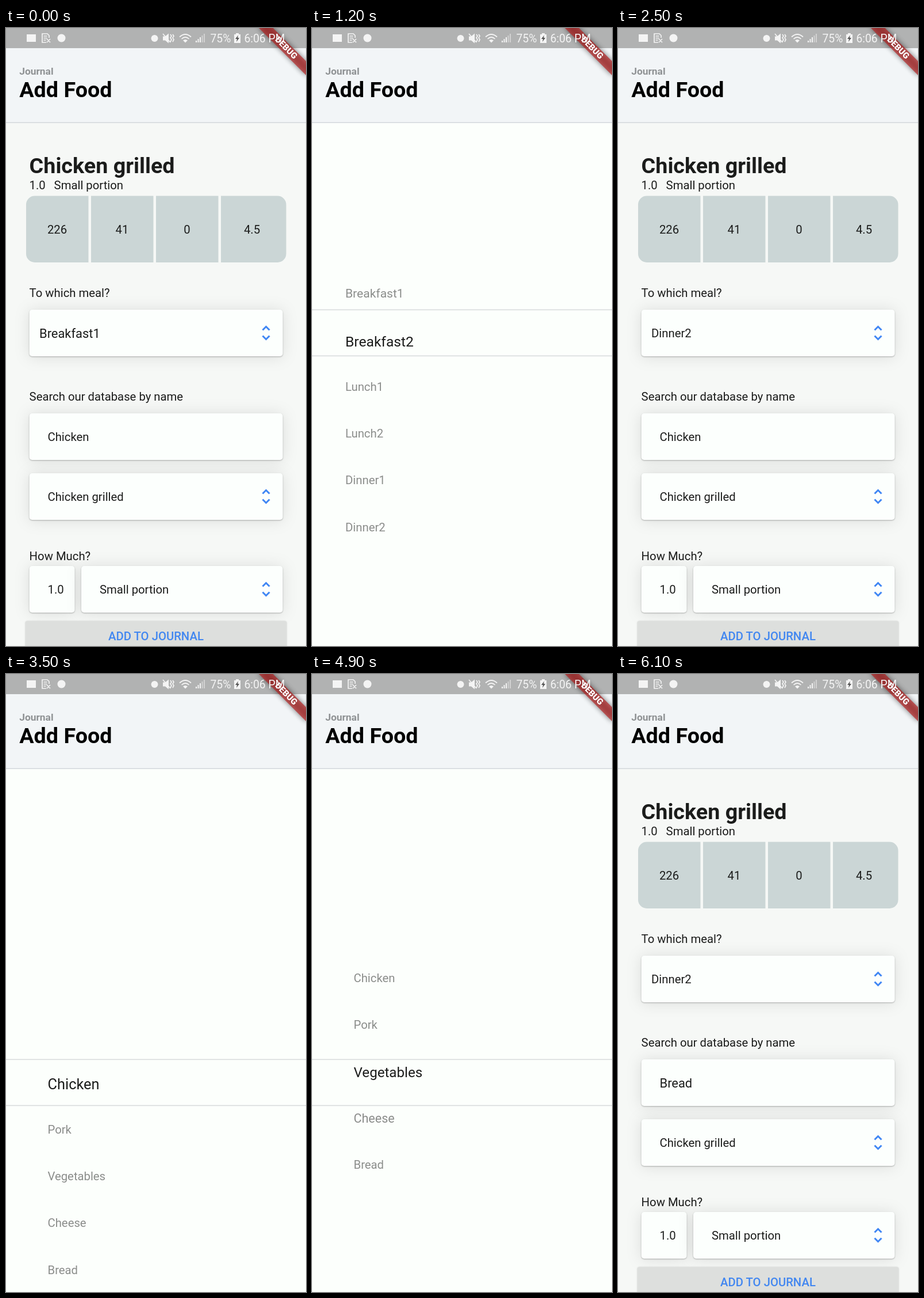
An HTML page for the animation above (6.2 s loop, 522 by 1073 pixels).

```html
<!DOCTYPE html>
<html lang="en">
<head>
<meta charset="utf-8">
<title>Add Food</title>
<style>
  html, body { margin: 0; width: 100%; height: 100%; overflow: hidden; background: #fcfffc; }
  svg { display: block; }
  text { font-family: Roboto, sans-serif; fill: #1b1c1b; }
  .tile { fill: #cbd6d6; }
  .card { fill: #fcfffd; filter: drop-shadow(0 1.5px 1px rgba(0,0,0,.28)) drop-shadow(0 1px 13px rgba(0,0,0,.11)); }
  .button { fill: #dddfdd; filter: drop-shadow(0 0 1px rgba(0,0,0,.12)); }
  .chev { fill: none; stroke: #3f86f4; stroke-width: 3; }
  .rule { fill: #dadcde; }
  .line { fill: none; stroke: #f4f4f4; stroke-width: 1.7; }
</style>
</head>
<body>
<svg width="522" height="1073" viewBox="0 0 522 1073">
  <clipPath id="round"><rect x="35" y="291.5" width="452.5" height="115.5" rx="15"/></clipPath>
  <filter id="soft" x="-20%" y="-100%" width="140%" height="300%"><feGaussianBlur stdDeviation="5"/></filter>

  <rect width="522" height="1073" fill="#f6f8f6"/>
  <g id="tiles" clip-path="url(#round)"></g>
  <g id="form"></g>
  <rect id="veil" y="165" width="522" height="908" fill="#fcfffc"/>
  <g id="wheels"></g>

  <g id="header">
    <rect width="522" height="165" fill="#f2f5f7"/>
    <rect y="163.5" width="522" height="1.5" fill="#d3d7dc"/>
    <rect width="522" height="35" fill="#b1b2b2"/>
  </g>

  <g id="banner" transform="translate(522 0) rotate(45)">
    <rect x="-58" y="40.6" width="116" height="17.4" opacity=".5" filter="url(#soft)"/>
    <rect x="-60" y="40.6" width="120" height="17.4" fill="#b71c1c" fill-opacity=".65"/>
  </g>

  <g id="status" fill="#f4f4f4">
    <rect x="36" y="11" width="16" height="13"/>
    <path class="line" d="M75 17V13l-3-3H63V25H70M65.500 14h6M65.500 17.500h6M65.500 21h4M71 19l6 6M77 19l-6 6"/>
    <circle cx="96.500" cy="17.500" r="7"/>
    <circle cx="258.500" cy="18" r="6"/>
    <path d="M273 14.500h4l6-5v17l-6-5h-4z"/>
    <path class="line" d="M273 10l13 15M286 11l2 3-2 3 2 3-2 4M290 11l2 3-2 3 2 3-2 4"/>
    <path class="line" d="M302 15.500q10-9 20 0M305.500 19q6.500-6 13 0"/>
    <path d="M308 21.500q4-3 8 0l-4 4z"/>
    <path d="M397 11h3v-2h5v2h3v15h-11z"/>
    <path d="M404 12.500l-5 6.500h3l-1 5 5-7h-3z" fill="#555"/>
  </g>
</svg>
<script>
const LOOP = 6200, STEP = 100, PITCH = 81.2, BODY = 20.3, TITLE = 37.7;
const LEFT = 40.6, FADE = 260, LAG = 120;
const $ = id => document.getElementById(id);

function node(tag, attrs, parent) {
  const el = document.createElementNS('http://www.w3.org/2000/svg', tag);
  for (const k in attrs) el.setAttribute(k, attrs[k]);
  return parent.appendChild(el);
}

// Text whose capitals are centred on y.
function label(parent, x, y, str, size = BODY, style = '', anchor = 'start') {
  const el = node('text', { x, y: y + .355 * size, 'font-size': size, style, 'text-anchor': anchor }, parent);
  el.textContent = str;
  return el;
}

function box(cls, x, y, width, height = 81, rx = 5, parent = $('form')) {
  return node('rect', { class: cls, x, y, width, height, rx }, parent);
}

// A white field, with up and down arrows if it opens a list.
function field(x, y, width, str, inset, arrows) {
  box('card', x, y, width);
  if (arrows) node('path', { class: 'chev', d: `M446.500 ${y + 35.5}l6-6 6 6m-12 10l6 6 6-6` }, $('form'));
  return label($('form'), x + inset, y + 40.6, str);
}

const form = $('form'), bold = 'font-weight:700;';
label(form, LEFT, 238.2, 'Chicken grilled', TITLE, bold);
label(form, LEFT, 273, '1.0');
label(form, 83.6, 273, 'Small portion');
['226', '41', '0', '4.5'].forEach((v, i) => {
  const x = 35 + 113 * i;
  box('tile', x, 291, i < 3 ? 108.5 : 114, 117, 0, $('tiles'));
  label(form, x + 54, 350, v, BODY, '', 'middle');
});
label(form, LEFT, 460, 'To which meal?');
const meal = field(LEFT, 489, 441, 'Dinner2', 17.4, true);
label(form, LEFT, 640, 'Search our database by name');
const food = field(LEFT, 669, 441, 'Chicken', 31.9, false);
field(LEFT, 773, 441, 'Chicken grilled', 31.9, true);
label(form, LEFT, 917, 'How Much?');
field(LEFT, 934, 79, '1.0', 31.9, false);
field(131, 934, 350.5, 'Small portion', 31.9, true);
box('button', 33.5, 1029.5, 455, 60, 4);
label(form, 261, 1056, 'ADD TO JOURNAL', BODY, 'font-weight:500;fill:#4287f0', 'middle');

label($('header'), 23.2, 75, 'Journal', 17.4, bold + 'fill:#8f9294');
label($('header'), 23.2, 106.2, 'Add Food', TITLE, bold + 'fill:#000');
label($('banner'), 0, 48.2, 'DEBUG', 14.8, 'font-weight:900;fill:#fff', 'middle');
label($('status'), 355.5, 18.1, '75%', 19.3, 'fill:#f4f4f4');
label($('status'), 414.5, 18.1, '6:06 PM', 19.3, 'fill:#f4f4f4');
for (let i = 0; i < 5; i++) {
  const h = 3 + 3 * i;
  node('rect', { x: 330 + 3.5 * i, y: 25 - h, width: 2, height: h, opacity: i < 3 ? 1 : .5 }, $('status'));
}

// moves: start, end, items passed, easing power
const wheels = [
  {
    field: meal, x: 58, y: 529.6, open: 0, close: 2060,
    names: ['Breakfast1', 'Breakfast2', 'Lunch1', 'Lunch2', 'Dinner1', 'Dinner2'],
    moves: [[900, 1600, 1.75, .85], [1600, 1900, 3.25, .85]]
  },
  {
    field: food, x: 72.5, y: 709.6, open: 3225, close: 5840,
    names: ['Chicken', 'Pork', 'Vegetables', 'Cheese', 'Bread'],
    moves: [[4100, 4800, 1.8, 1.5], [4800, 5600, 2.2, .77]]
  }
];

for (const w of wheels) {
  w.g = node('g', {}, $('wheels'));
  w.rules = [-41.1, 38.9].map(d => box('rule', 0, w.y + d, 522, 1.6, 0, w.g));
  w.items = w.names.map(name => label(w.g, 0, 11, name));
}

const ramp = (t, a, b) => Math.min(1, Math.max(0, (t - a) / (b - a)));

function drawWheel(w, t) {
  const { open, close } = w;
  const active = t >= open - LAG && t < close + FADE + LAG;
  w.g.style.display = active ? '' : 'none';
  w.field.style.display = active ? 'none' : '';
  if (!active) return 0;

  const veil = ramp(t, open, open + FADE) - ramp(t, close, close + FADE);
  const grow = ramp(t, open - LAG, open + FADE) - ramp(t, close, close + FADE + LAG);
  const pos = w.moves.reduce((sum, [a, b, n, pow]) => sum + n * ramp(t, a, b) ** pow, 0);
  const shown = Math.min(1, veil * 1.15), picked = Math.round(pos);

  w.rules.forEach(r => r.style.opacity = shown);
  w.items.forEach((el, i) => {
    const d = i - pos, s = 1 + .25 * grow * Math.max(0, 1 - Math.abs(d));
    el.setAttribute('transform', `translate(${w.x} ${w.y + d * PITCH - 11}) scale(${s})`);
    el.style.fill = i === picked ? '#1b1c1b' : '#8b8d8b';
    el.style.opacity = i === picked ? 1 : shown;
  });
  return veil;
}

function tick() {
  // The picture advances ten times a second.
  const t = Math.floor((performance.now() + 8) % LOOP / STEP) * STEP;
  $('veil').style.opacity = Math.max(...wheels.map(w => drawWheel(w, t)));
  requestAnimationFrame(tick);
}
tick();
</script>
</body>
</html>
```
